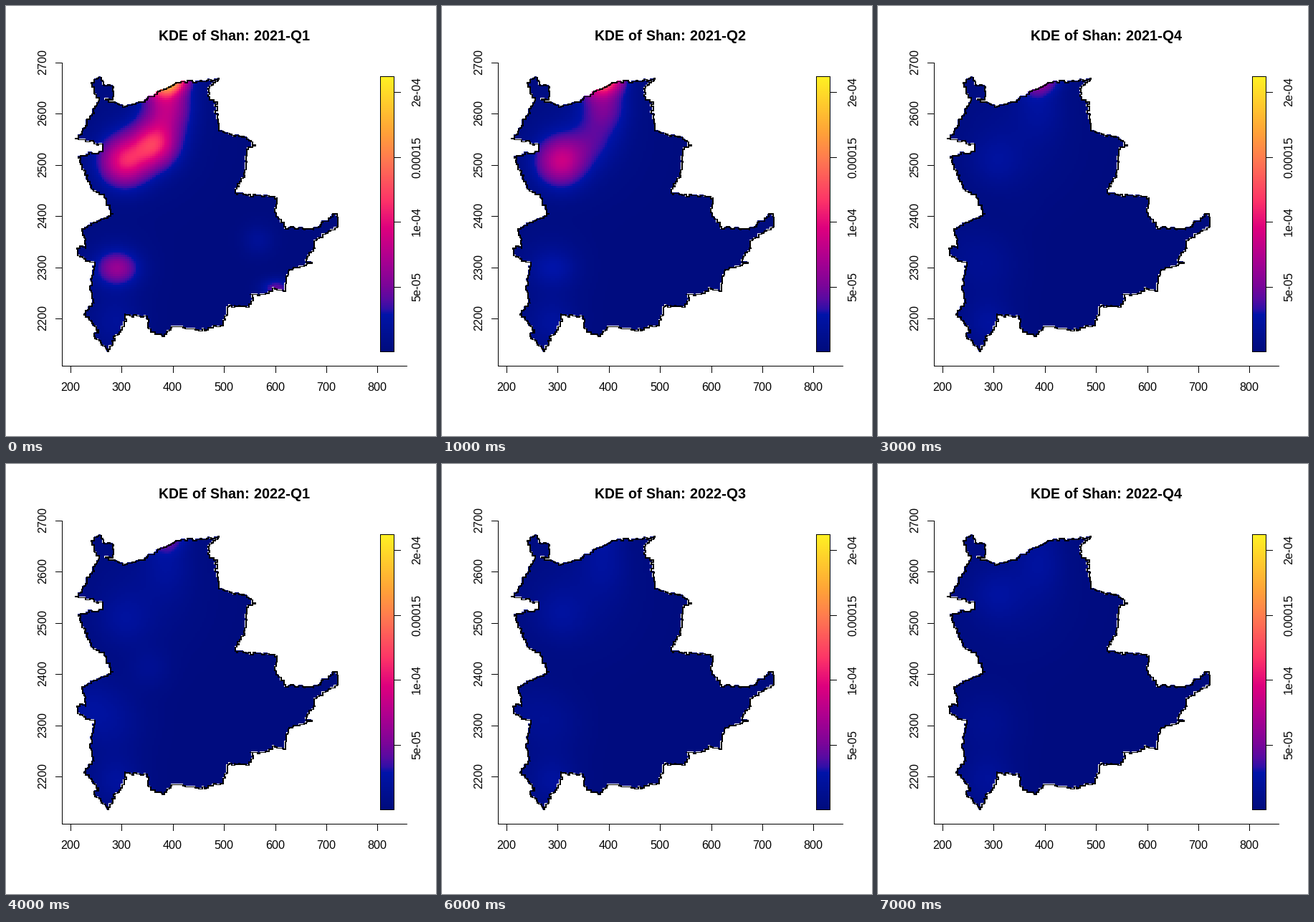
Recreate the animation shown at these times as a matplotlib script. Size 600 by 600 pixels, loop 8 s.

```python
import numpy as np
import matplotlib.pyplot as plt
from matplotlib.animation import FuncAnimation
from matplotlib.colors import LinearSegmentedColormap
from matplotlib.path import Path

plt.rcParams.update({"font.family": "Liberation Sans", "text.hinting": "native",
                     "text.hinting_factor": 1})
DPI = 100
PX = 72 / DPI  # points per pixel
X0, X1, Y0, Y1, N = 97, 466, 98, 482, 128  # heat map box and cells per side

# Blue-magenta-yellow ramp
RAMP = [(0, "#000c7d"), (.135, "#0014a9"), (.155, "#3010a8"), (.19, "#570ba2"),
        (.24, "#7b0599"), (.34, "#ad0090"), (.45, "#de007e"), (.55, "#fd3468"),
        (.7, "#ff7a50"), (.8, "#ffa338"), (1, "#fff123")]
CMAP = LinearSegmentedColormap.from_list("bmy", RAMP, N=256)

# Main corners of the region, clockwise; the fine coast is added by rough_border
CORNERS = [
    (118, 106), (130, 99), (138, 110), (148, 112), (150, 129), (139, 131),
    (163, 140), (191, 132), (213, 119), (240, 105), (285, 104), (297, 101),
    (282, 116), (283, 130), (292, 133), (298, 176), (333, 183), (346, 195),
    (336, 200), (332, 236), (318, 261), (378, 267), (375, 291), (390, 309),
    (428, 312), (460, 289), (464, 307), (430, 328), (430, 340), (417, 356),
    (426, 358), (395, 368), (388, 397), (375, 393), (360, 403), (341, 402),
    (345, 411), (338, 419), (311, 418), (303, 444), (273, 452), (234, 446),
    (222, 460), (201, 453), (196, 434), (166, 430), (165, 450), (152, 460),
    (144, 481), (122, 458), (130, 453), (109, 428), (121, 412), (118, 390),
    (123, 358), (99, 347), (99, 337), (112, 334), (106, 310), (149, 290),
    (138, 264), (121, 255), (101, 209), (134, 203), (133, 192), (98, 185),
    (122, 148), (128, 128),
]


def rough_border(points, seed=4):
    """Wiggle the border and turn it into small stair steps."""
    rng = np.random.default_rng(seed)
    pts = np.array(points, float)
    walk = []
    for a, b in zip(pts, np.roll(pts, -1, axis=0)):
        n = max(1, int(np.hypot(*(b - a)) / 3))
        for t in np.arange(n) / n:
            walk.append(a + (b - a) * t + rng.normal(0, 0.8, 2))
    grid = np.array([X1 - X0, Y1 - Y0]) / N / 2
    snapped = np.round(np.array(walk) / grid) * grid
    out = [snapped[0]]
    for p in np.vstack([snapped[1:], snapped[:1]]):
        out += [(p[0], out[-1][1]), p]
    return np.array(out)


border = rough_border(CORNERS)
mid = (np.arange(N) + .5) / N
gx, gy = np.meshgrid(X0 + mid * (X1 - X0), Y0 + mid * (Y1 - Y0))
cells = np.column_stack([gx.ravel(), gy.ravel()])
outside = ~Path(border).contains_points(cells).reshape(N, N)


def blob(x, y, height, along, across=None, tilt=0):
    c, s = np.cos(np.radians(tilt)), np.sin(np.radians(tilt))
    u = (gx - x) * c + (gy - y) * s
    v = (gy - y) * c - (gx - x) * s
    return height * np.exp(-(u / along) ** 2 / 2 - (v / (across or along)) ** 2 / 2)


def drop(q, span):
    """Stays high at first, then falls away."""
    return np.exp(-(q / span) ** 3)


def pulse(q, peak, width):
    return np.exp(-((q - peak) / width) ** 2)


def density(q):
    """Heat surface of quarter q: fixed hot spots that fade or flare up."""
    surge = pulse(q, 2, .5)
    z = (
        .01 + blob(190, 185, .045, 52)
        # northern border
        + blob(228 + 20 * surge, 106, .72 * np.exp(-.3 * q) - .07 + .15 * surge,
               18 + 14 * surge, 12 + 4 * surge, -20)
        + blob(226, 136, .07 + .27 * drop(q, 1.2), 22, 30)
        # north-west
        + blob(165, 217 - 35 * pulse(q, 7, .8), .06 + .38 * drop(q, 1.6), 24)
        + blob(207, 193, .43 * drop(q, .87), 22)
        # south-west
        + blob(155, 366, .24 * drop(q, .95), 20, 16)
        + blob(152, 362, .05, 32)
        + blob(108, 341, .2 * pulse(q, 5, .55), 18)
        + blob(115, 340, .08 * pulse(q, 4.5, 1.3), 32)
        + blob(156, 444, .12 * (pulse(q, 2, .7) + pulse(q, 5, .7)), 12)
        + blob(153, 441, .075, 25)
        # centre and east
        + blob(200, 285, .05 * pulse(q, 4, .7), 20)
        + blob(352, 327, .07 * drop(q, .6), 15)
        + blob(377, 394, .2 * drop(q, .6), 14, 9)
    )
    return np.ma.array(z, mask=outside)


surfaces = [density(q) for q in range(8)]

fig = plt.figure(figsize=(6, 6), dpi=DPI, facecolor="white")
ax = fig.add_axes([0, 0, 1, 1])
ax.axis("off")


def heat_image(values, extent):
    return ax.imshow(values, extent=extent, cmap=CMAP, vmin=0, vmax=1,
                     interpolation="nearest", aspect="auto")


def line(xs, ys):
    ax.plot(np.add(xs, .5), np.add(ys, .5), color="black", lw=PX, snap=False,
            antialiased=False, solid_capstyle="projecting")


def label(x, y, text, rotation=0):
    ax.text(x, y, text, fontsize=16 * PX, rotation=rotation, ha="center",
            va="baseline", rotation_mode="anchor")


heat = heat_image(surfaces[0], (X0, X1, Y1, Y0))
line(border[:, 0], border[:, 1])

# Axes
line([78, 559], [502, 502])
line([78, 78], [79, 502])
for i in range(7):
    x = round(90 + 71.4 * i)
    line([x, x], [502, 511])
    label(x - .5, 537, str(200 + 100 * i))
for i in range(6):
    y = round(436 - 71.4 * i)
    line([69, 78], [y, y])
    label(56, y - 1, str(2200 + 100 * i), 90)

# Colour key
heat_image(np.linspace(1, 0, 256)[:, None], (522, 542, 483, 98))
line([522, 541, 541, 522, 522], [98, 98, 482, 482, 98])
for i, text in enumerate(["5e-05", "1e-04", "0.00015", "2e-04"]):
    y = round(392 - 90.7 * i)
    line([541, 550], [y, y])
    label(578, y - .5, text, 90)

title = ax.text(318.5, 48, "", fontsize=20 * PX, weight="bold",
                ha="center", va="baseline")
ax.set_xlim(0, 600)
ax.set_ylim(600, 0)


def update(q):
    heat.set_data(surfaces[q])
    title.set_text(f"KDE of Shan: {2021 + q // 4}-Q{q % 4 + 1}")
    return heat, title


anim = FuncAnimation(fig, update, frames=8, interval=1000, repeat=True, blit=False)
plt.show()
```
